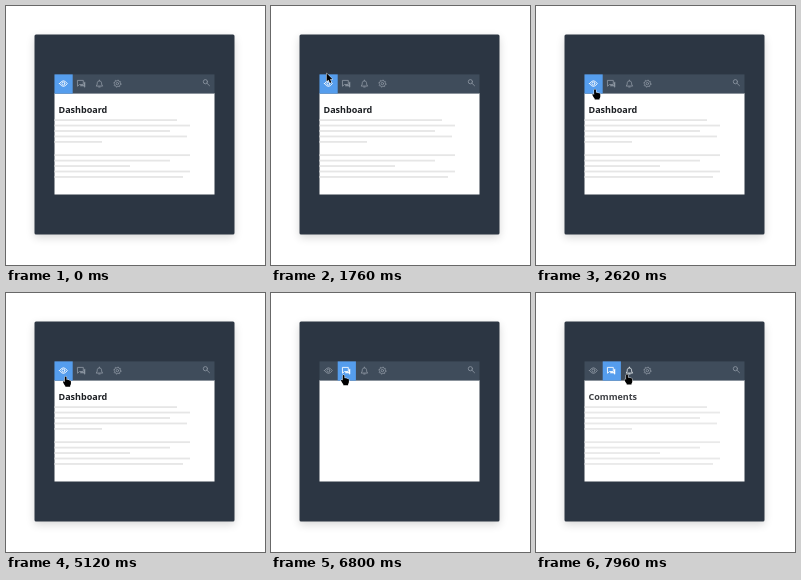
Recreate the animation shown at these times as an HTML page with a canvas. Size 259x259 px, loop 8000 ms.

```html
<!DOCTYPE html>
<html lang="en">
<head>
<meta charset="utf-8">
<title>Tab bar</title>
<style>
html, body { margin: 0; width: 100%; height: 100%; overflow: hidden; background: #fff; }
canvas { display: block; width: 100vw; height: 100vh; }
</style>
</head>
<body>
<canvas id="stage"></canvas>
<script>
const SIZE = 259, LOOP = 8000;
const SWITCH = 6800, FADE = 7060, FADE_LEN = 1060;
const TAB_X = 48, TAB_Y = 68, TAB_W = 18.2, TAB_H = 19.2;
const canvas = document.getElementById('stage');
const ctx = canvas.getContext('2d');

// Pointer hotspot: time, x, y
const PATH = [
  [500, 60, -10], [800, 58, 6], [1060, 56.2, 22], [1240, 55, 35],
  [1340, 55, 36.5], [1560, 54.8, 53.5], [1760, 55.2, 67], [1920, 56, 74], [2080, 57, 78],
  [2180, 57.3, 78.8], [2300, 58, 80.8], [2440, 58.6, 82.2], [2620, 59, 83],
  [5100, 59, 83], [5120, 59.6, 83.2], [5260, 64, 83.2], [5400, 69.2, 82.6], [5560, 72.6, 81.6],
  [7480, 72.6, 81.6], [7600, 75, 81.6], [7820, 85, 81.3], [7919, 85.4, 81.2],
  [7920, 87, 81.1], [7960, 91, 81]
];
const ROWS = [171, 184, 164, 181, 96, 184, 164, 124, 184, 177];

const clamp = v => Math.max(0, Math.min(1, v));

function pointerAt(t) {
  if (t < PATH[0][0]) return null;
  const i = PATH.findIndex(p => p[0] > t);
  if (i < 0) return PATH[PATH.length - 1].slice(1);
  const a = PATH[i - 1], b = PATH[i];
  const k = (t - a[0]) / (b[0] - a[0]);
  return [a[1] + (b[1] - a[1]) * k, a[2] + (b[2] - a[2]) * k];
}

function rect(color, x, y, w, h) {
  ctx.fillStyle = color;
  ctx.fillRect(x, y, w, h);
}

function icon(x, y, color, d, fill) {
  ctx.save();
  ctx.translate(x, y);
  ctx.lineWidth = 0.85;
  ctx.lineJoin = ctx.lineCap = 'round';
  ctx.strokeStyle = ctx.fillStyle = color;
  ctx.stroke(new Path2D(d));
  if (fill) ctx.fill(new Path2D(fill));
  ctx.restore();
}

const circle = r => `M${r} 0A${r} ${r} 0 1 1 ${-r} 0A${r} ${r} 0 1 1 ${r} 0`;

function gear() {
  let d = circle(1.2);
  for (let i = 0; i <= 32; i++) {
    const a = (i + 0.5) * Math.PI / 16;
    const r = i % 4 < 2 ? 3.6 : 2.8;
    d += (i ? 'L' : 'M') + (r * Math.cos(a)).toFixed(2) + ' ' + (r * Math.sin(a)).toFixed(2);
  }
  return d;
}

const ICONS = [
  ['M-3.9 0Q-2 -2.8 0 -2.8T3.9 0Q2 2.8 0 2.8T-3.9 0Z' + circle(1.5)],
  ['M-3.6 -3.2H1.9V0.9H-1.9L-3.6 2.4ZM3.4 -1.4V3.6L2 2.2H-0.9', 'M2.6 -1.2H3.6V3.5L2 2.4H-0.8V1.6H2.6Z'],
  ['M-3 2.2C-1.9 1.2 -2.3 -0.2 -2 -1.3C-1.6 -3.2 1.6 -3.2 2 -1.3C2.3 -0.2 1.9 1.2 3 2.2ZM0 -2.8V-3.5M-0.7 3.4H0.7'],
  [gear()]
];
const SEARCH = 'M1.1 -0.9A2.1 2.1 0 1 1 -3.1 -0.9A2.1 2.1 0 1 1 1.1 -0.9M0.6 0.7L3.1 3.1';

const ARROW = new Path2D('M0.4 0.3V8.4L2.3 6.7L3.7 9.9L5.2 9.2L3.8 6.2H6.3Z');
const HAND = new Path2D('M-0.9 6V1.2Q-0.9 0.3 0 0.3T0.9 1.2V3.7Q1.7 3 2.4 3.9Q3.2 3.4 3.8 4.3'
  + 'Q5.3 4 5.3 5.5V7.4Q5.2 8.8 4.5 9.5V10.6H-0.3V9.7Q-1.4 8.5 -2.5 6.2Q-2.8 5.2 -2 5.1Q-1.4 5.1 -0.9 6Z');

function drawPointer([x, y]) {
  const shape = y > TAB_Y ? HAND : ARROW;
  ctx.save();
  ctx.translate(x, y);
  ctx.lineJoin = 'round';
  ctx.lineWidth = 0.9;
  ctx.strokeStyle = '#fff';
  ctx.stroke(shape);
  ctx.fillStyle = '#000';
  ctx.fill(shape);
  ctx.restore();
}

function drawCard(scale) {
  ctx.save();
  ctx.shadowColor = 'rgba(0,0,0,.16)';
  ctx.shadowBlur = 9 * scale;
  ctx.shadowOffsetY = 3 * scale;
  ctx.fillStyle = '#2c3643';
  ctx.beginPath();
  ctx.roundRect(28.5, 28.5, 200, 200, 1.5);
  ctx.fill();
  ctx.restore();
  rect('#fff', 48.5, 87, 160, 101.5);
  rect('#3f4c5b', 48.5, TAB_Y + 0.4, 160, TAB_H);
}

function drawTabs(active, pointer) {
  rect('#559ded', TAB_X + 0.5 + active * TAB_W, TAB_Y + 0.4, TAB_W, TAB_H);
  const over = pointer && pointer[1] > TAB_Y
    ? Math.floor((pointer[0] - TAB_X - 0.5) / TAB_W) : -1;
  ICONS.forEach(([line, fill], i) => {
    const color = i === active ? '#fff' : i === over ? '#e6eaee' : '#8d97a2';
    icon(57.4 + i * 18, 77.6, color, line, fill);
  });
  icon(200.4, 76.6, '#8d97a2', SEARCH);
}

function drawPage(title, alpha) {
  ctx.globalAlpha = alpha;
  ctx.fillStyle = '#1c1f23';
  ctx.font = 'bold 9px "Open Sans", "Noto Sans", sans-serif';
  ctx.fillText(title, 52.5, 107.3);
  ROWS.forEach((end, i) => {
    const y = 113.2 + i * 5.45 + (i > 4 ? 7.8 : 0);
    rect('#e6e6e6', 48.5, y, end - 48.5, 1.8);
  });
  ctx.globalAlpha = 1;
}

function draw(t) {
  const dpr = window.devicePixelRatio || 1;
  const w = Math.round(innerWidth * dpr), h = Math.round(innerHeight * dpr);
  if (canvas.width !== w || canvas.height !== h) {
    canvas.width = w;
    canvas.height = h;
  }
  ctx.setTransform(w / SIZE, 0, 0, h / SIZE, 0, 0);
  rect('#fff', 0, 0, SIZE, SIZE);

  const pointer = pointerAt(t);
  const switched = t >= SWITCH;
  drawCard(w / SIZE);
  drawTabs(switched ? 1 : 0, pointer);
  if (switched) drawPage('Comments', clamp((t - FADE) / FADE_LEN));
  else drawPage('Dashboard', 1);
  if (pointer) drawPointer(pointer);
}

function tick() {
  draw(performance.now() % LOOP);
  requestAnimationFrame(tick);
}
tick();
</script>
</body>
</html>
```
